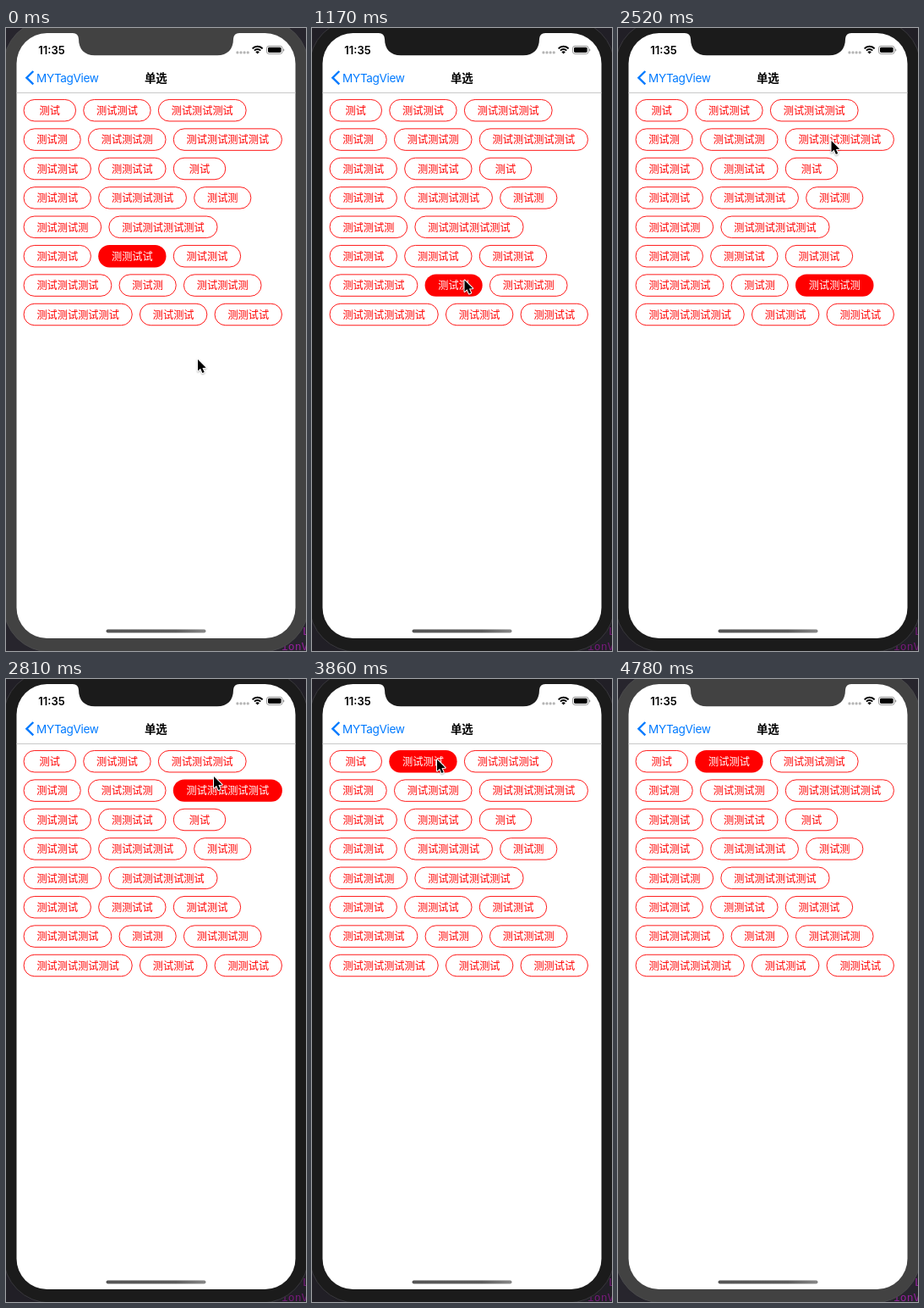
These frames come from a looping animation (355 by 735 pixels, 4880 ms). An HTML page with a canvas:

```html
<!DOCTYPE html>
<html lang="zh-CN">
<head>
<meta charset="utf-8">
<title>Tag picker</title>
<style>
html, body { margin: 0; width: 100%; height: 100%; overflow: hidden; background: #211f26; }
canvas { display: block; width: 355px; height: 735px; }
</style>
</head>
<body>
<canvas id="stage"></canvas>
<script>
const W = 355, H = 735, LOOP = 4880;
const canvas = document.getElementById('stage');
const ctx = canvas.getContext('2d');
const ratio = window.devicePixelRatio || 1;
canvas.width = W * ratio;
canvas.height = H * ratio;

const CJK = '"Noto Sans CJK SC", "Noto Sans CJK", "Noto Sans CJK JP", sans-serif';
const LATIN = 'Inter, "Liberation Sans", sans-serif';
const RED = '#ff0000', BLUE = '#007aff';

const rows = [
  ['测试', '测试测试', '测试测试测试'],
  ['测试测', '测试测试测', '测试测试测试测试'],
  ['测试测试', '测测试试', '测试'],
  ['测试测试', '测试测试测试', '测试测'],
  ['测试测试测', '测试测试测试测试'],
  ['测试测试', '测测试试', '测试测试'],
  ['测试测试测试', '测试测', '测试测试测'],
  ['测试测试测试测试', '测试测试', '测测试试']
];

// Flow layout: width follows the label, with a minimum.
const tags = rows.flatMap((row, r) => {
  let x = 20.6;
  return row.map((label, c) => {
    const w = Math.max(62.4, label.length * 12.2 + 31.5);
    const tag = { label, key: r + ',' + c, x, y: 84 + r * 34.4, w, h: 26.4 };
    x += w + 8.3;
    return tag;
  });
});

// Time and selected tag
const picks = [[0, '5,1'], [1170, '6,1'], [1920, '6,2'], [2660, '1,2'], [3260, '0,2'], [3860, '0,1']];

// Pointer positions, each held until the next
const pointer = [
  [0, 227, 391], [140, 225, 387], [290, 220, 376], [440, 211, 357], [590, 200, 334],
  [730, 190, 314], [880, 183, 301], [1030, 180.5, 297.5],
  [1320, 188, 304], [1470, 213, 310], [1620, 243, 305], [1770, 255.5, 300],
  [2070, 255, 262], [2220, 253, 175], [2370, 252, 141], [2520, 252.5, 133],
  [2810, 246, 115], [2960, 239.5, 103],
  [3410, 190, 98], [3560, 148, 95],
  [4010, 168, 150], [4160, 240, 400], [4300, 304, 664], [4450, -50, -50]
];

const held = (list, t) => list.findLast(item => item[0] <= t);

function pill(x, y, w, h, r, fill) {
  ctx.beginPath();
  ctx.roundRect(x, y, w, h, r);
  if (fill) {
    ctx.fillStyle = fill;
    ctx.fill();
  }
}

function line(points, color, width) {
  ctx.beginPath();
  points.forEach(([x, y]) => ctx.lineTo(x, y));
  ctx.strokeStyle = color;
  ctx.lineWidth = width;
  ctx.stroke();
}

function text(str, x, y, font, color, align = 'left', spacing = 0) {
  ctx.font = font;
  ctx.fillStyle = color;
  ctx.textAlign = align;
  ctx.letterSpacing = spacing + 'px';
  ctx.fillText(str, x, y);
}

function drawDevice(active) {
  const bezel = active ? '#1b1b1b' : '#424242';
  ctx.fillStyle = active ? '#211f26' : '#27252d';
  ctx.fillRect(0, 0, W, H);
  const magenta = active ? '#741a78' : '#93209a';
  text('ionV', 326, 734, '13px "DejaVu Sans Mono", monospace', magenta);
  text('L', 351, 716, '13px "DejaVu Sans Mono", monospace', magenta);
  pill(-3, -10, 361, 746, 55, bezel);
  ctx.strokeStyle = active ? '#39383d' : '#4a4a4c';
  ctx.lineWidth = 1;
  ctx.stroke();
  pill(12.5, 6, 330, 714, 36, '#fff');

  // Notch with flared shoulders
  ctx.beginPath();
  ctx.moveTo(79, 5);
  ctx.lineTo(79, 6);
  ctx.quadraticCurveTo(85.5, 6, 86, 13);
  ctx.bezierCurveTo(86, 25, 93, 32.3, 105, 32.3);
  ctx.lineTo(250, 32.3);
  ctx.bezierCurveTo(262, 32.3, 269, 25, 269, 13);
  ctx.quadraticCurveTo(269.5, 6, 276, 6);
  ctx.lineTo(276, 5);
  ctx.fillStyle = bezel;
  ctx.fill();
}

function drawStatus() {
  text('11:35', 54, 30.5, '600 13px ' + LATIN, '#000', 'center');
  for (let i = 0; i < 4; i++) pill(272.3 + i * 4.1, 27.3, 3.2, 3.2, 1.6, '#b4b4b4');

  // Wi-Fi fan
  ctx.strokeStyle = '#000';
  ctx.lineWidth = 1.9;
  for (const r of [8.2, 5]) {
    ctx.beginPath();
    ctx.arc(297.6, 30, r, -Math.PI * 0.76, -Math.PI * 0.24);
    ctx.stroke();
  }
  ctx.beginPath();
  ctx.moveTo(297.6, 30.6);
  ctx.arc(297.6, 30.6, 3.2, -Math.PI * 0.75, -Math.PI * 0.25);
  ctx.fillStyle = '#000';
  ctx.fill();

  pill(308.5, 21.3, 18.6, 9.2, 2.6);
  ctx.strokeStyle = '#8c8c8c';
  ctx.lineWidth = 0.9;
  ctx.stroke();
  pill(310, 22.8, 15.6, 6.2, 1.4, '#000');
  pill(328.1, 24.4, 1.1, 3, 0.6, '#8c8c8c');
}

function drawNav() {
  ctx.lineCap = ctx.lineJoin = 'miter';
  line([[32.3, 51], [24.4, 58.7], [32.3, 66.4]], BLUE, 2.4);
  text('MYTagView', 36, 63.5, '13.6px ' + LATIN, BLUE, 'left', -0.4);
  text('单选', 177.3, 63.7, '600 13.4px ' + CJK, '#000', 'center');
  ctx.fillStyle = '#c9c9c9';
  ctx.fillRect(12.5, 76, 330, 1);
}

function drawTag({ label, x, y, w, h }, on) {
  if (on) {
    pill(x, y, w, h, h / 2, RED);
  } else {
    pill(x + 0.45, y + 0.45, w - 0.9, h - 0.9, h / 2 - 0.45);
    ctx.strokeStyle = RED;
    ctx.lineWidth = 0.9;
    ctx.stroke();
  }
  text(label, x + w / 2, y + h / 2 + 4.7, '12.2px ' + CJK, on ? '#fff' : RED, 'center');
}

function drawHomeBar() {
  const shade = ctx.createLinearGradient(118, 0, 237, 0);
  shade.addColorStop(0, '#555');
  shade.addColorStop(0.7, '#5c5c5c');
  shade.addColorStop(1, '#888');
  pill(118.5, 709.5, 118, 4, 2, shade);
}

function drawPointer(x, y) {
  ctx.save();
  ctx.translate(x, y);
  ctx.beginPath();
  [[0, 0], [0, 13.6], [3.1, 10.7], [5.4, 16], [7.7, 15], [5.4, 9.9], [9.7, 9.7]]
    .forEach(([px, py]) => ctx.lineTo(px, py));
  ctx.closePath();
  ctx.lineJoin = 'round';
  ctx.shadowColor = 'rgba(0,0,0,.3)';
  ctx.shadowBlur = 2 * ratio;
  ctx.shadowOffsetY = ratio;
  ctx.strokeStyle = '#fff';
  ctx.lineWidth = 2;
  ctx.stroke();
  ctx.shadowColor = 'transparent';
  ctx.fillStyle = '#000';
  ctx.fill();
  ctx.restore();
}

function draw(t) {
  ctx.setTransform(ratio, 0, 0, ratio, 0, 0);
  drawDevice(t >= 1170 && t < 4780);
  drawStatus();
  drawNav();
  const picked = held(picks, t)[1];
  tags.forEach(tag => drawTag(tag, tag.key === picked));
  drawHomeBar();
  const [, x, y] = held(pointer, t);
  drawPointer(x, y);
}

const start = performance.now();
function tick() {
  draw((performance.now() - start) % LOOP);
  requestAnimationFrame(tick);
}
tick();
</script>
</body>
</html>
```
